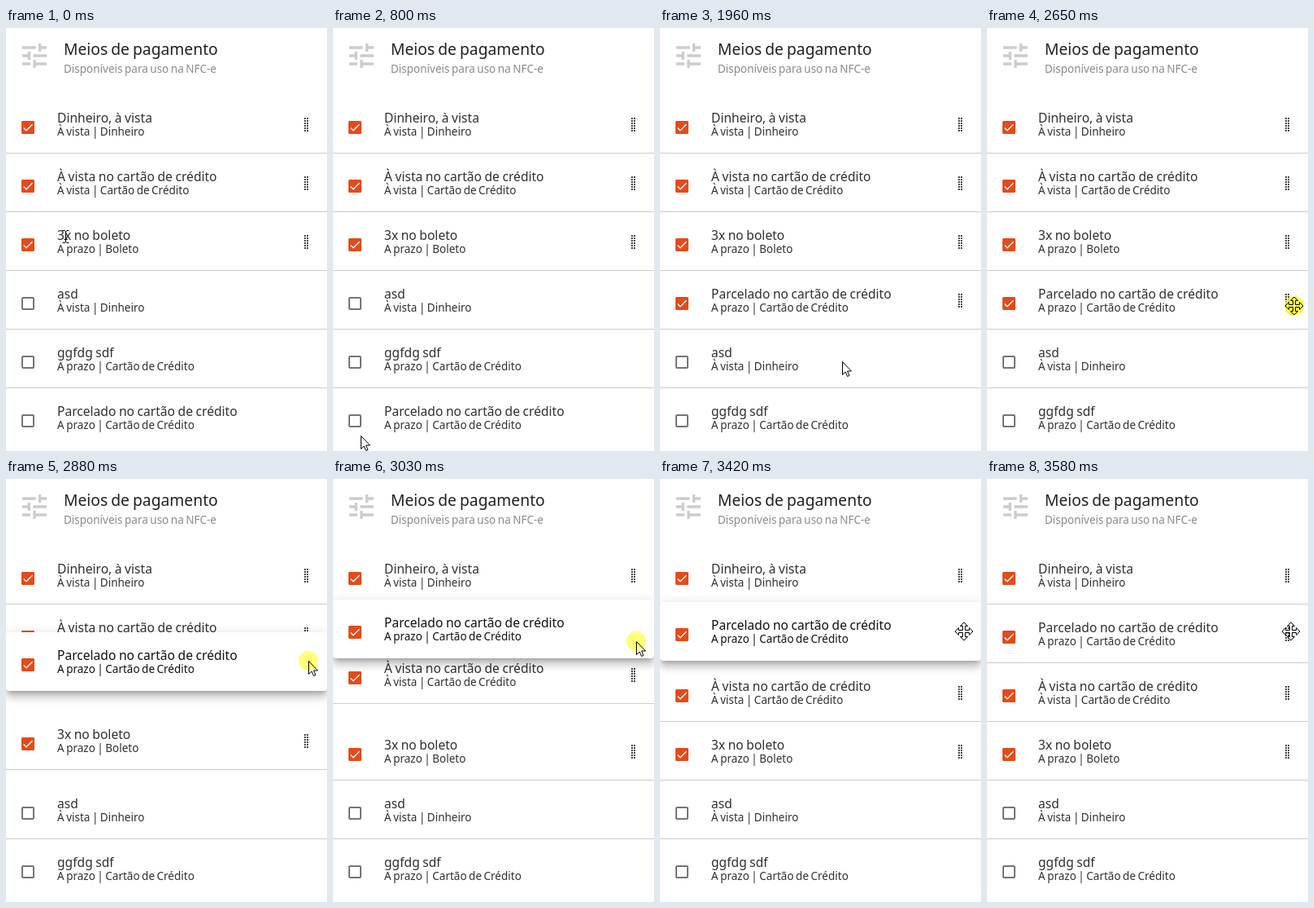
Animation of 395x519 px, one loop 4190 ms. Source, as an HTML page:

```html
<!DOCTYPE html>
<html lang="pt">
<head>
<meta charset="utf-8">
<title>Meios de pagamento</title>
<style>
html, body { margin: 0; width: 100%; height: 100%; overflow: hidden; background: #fff; }
body { position: relative; font-family: "Noto Sans", "Open Sans", sans-serif; }
svg { position: absolute; left: 0; top: 0; overflow: visible; }
text { font-size: 13.5px; word-spacing: -1px; fill: #303030; }
.name { font-size: 15.6px; word-spacing: -.5px; }
.row { position: absolute; left: 0; top: 0; width: 395px; height: 72px; }
.drag {
  z-index: 1; background: #fff; border-radius: 4px;
  box-shadow: 0 5px 5px -3px rgba(0,0,0,.2), 0 8px 10px 1px rgba(0,0,0,.14), 0 3px 14px 2px rgba(0,0,0,.12);
}
.drag text { fill: #111; }
.drag .grip, .drag .line { visibility: hidden; }
#pointer { z-index: 2; }
#pointer path { fill: #fff; stroke: #000; stroke-linejoin: round; }
#pointer circle { fill: #ff0; mix-blend-mode: multiply; }
</style>
</head>
<body>
<svg width="395" height="82">
  <path transform="translate(15 14) scale(1.667)" fill="#ccc" d="M3 17v2h6v-2H3zM3 5v2h10V5H3zm10 16v-2h8v-2h-8v-2h-2v6h2zM7 9v2H3v2h4v2h2V9H7zm14 4v-2H11v2h10zm-6-4h2V7h4V5h-4V3h-2v6z"/>
  <text x="71" y="33" style="font-size:19.3px;fill:#212121">Meios de pagamento</text>
  <text x="71" y="55" style="font-size:13.5px;fill:#8a8a8a">Disponíveis para uso na NFC-e</text>
</svg>
<div id="list"></div>
<svg id="pointer" width="1" height="1">
  <path/>
  <circle r="12"/>
</svg>
<script>
const LOOP = 4190, TOP = 82, STEP = 72;
const REORDER = 1320, GRAB = 2725, RELEASE = 3190, SETTLED = 3500;
const items = [
  ['Dinheiro, à vista', 'À vista | Dinheiro'],
  ['À vista no cartão de crédito', 'À vista | Cartão de Crédito'],
  ['3x no boleto', 'A prazo | Boleto'],
  ['asd', 'À vista | Dinheiro'],
  ['ggfdg sdf', 'A prazo | Cartão de Crédito'],
  ['Parcelado no cartão de crédito', 'A prazo | Cartão de Crédito']
];
const shapes = {
  arrow: 'M.5 .5V16.5L4.2 13 6.6 18.5 9 17.5 6.6 12H11.5Z',
  beam: 'M-3.5-7.5H-1L.5-6.5 2-7.5H4.5M.5-6.5V6.5M-3.5 7.5H-1L.5 6.5 2 7.5H4.5M-1.5 3.5H2.5',
  hand: 'M-2 1.5Q0-1 2 1.5V8Q3.5 6.5 5 8.5Q6.5 7.5 7.5 9.5Q9.5 9 10 11V16Q9 19 8 22.5H-1Q-2 19-5.5 14Q-6.5 11-4 11.5L-2 14ZM2 8V12M5 9V12M7.5 10V12',
  move: 'M0-11L4.5-6.5H1.5V-1.5H6.5V-4.5L11 0 6.5 4.5V1.5H1.5V6.5H4.5L0 11-4.5 6.5H-1.5V1.5H-6.5V4.5L-11 0-6.5-4.5V-1.5H-1.5V-6.5H-4.5Z'
};

const list = document.getElementById('list');
list.innerHTML = items.map(([name, kind]) => `<div class="row"><svg width="395" height="72">
  <circle class="ripple" cx="27" cy="40" r="20"/>
  <rect x="20" y="33" width="14" height="14" rx="1" fill="none" stroke="#757575" stroke-width="2"/>
  <g class="check"><rect x="19" y="32" width="16" height="16" rx="2" fill="#e64a19"/>
    <path d="M21.7 40.5L25 43.7 32.5 36.2" fill="none" stroke="#fff" stroke-width="1.4"/></g>
  <text class="name" x="63" y="34">${name}</text>
  <text x="63" y="50">${kind}</text>
  <path class="grip" d="M368 28V45M371 28V45" stroke="#444" stroke-width="2" stroke-dasharray="2 1"/>
  <rect class="line" y="71" width="395" height="1" fill="#ccc"/>
</svg></div>`).join('');

const rows = [...list.children].map(el => {
  const part = c => el.querySelector('.' + c);
  return { el, ripple: part('ripple'), check: part('check'), grip: part('grip'), line: part('line') };
});
const pointer = document.getElementById('pointer');
const [cursor, halo] = pointer.children;

const span = (t, a, b) => Math.min(1, Math.max(0, (t - a) / (b - a)));
const smooth = x => x * x * (3 - 2 * x);
const out = (x, p) => 1 - (1 - x) ** p;
const mix = (a, b, k) => a + (b - a) * k;

// time, x, y of the pointer's hot spot
const path = [
  [0, 73, 256], [40, 73, 256], [570, 58, 494], [620, 58, 494], [800, 34, 500], [960, 32, 489],
  [1690, 33, 489], [2190, 373, 347], [2350, 378, 341], [2700, 378, 341], [2880, 372, 223],
  [3110, 374, 187], [LOOP, 374, 187]
];

function pointerAt(t) {
  const i = path.findIndex(p => p[0] > t);
  const [t0, x0, y0] = path[i - 1], [t1, x1, y1] = path[i];
  const x = span(t, t0, t1), k = t0 < 2700 ? smooth(x) : x;
  return [Math.round(mix(x0, x1, k)), Math.round(mix(y0, y1, k))];
}

function pointerShape(t, x, y) {
  if (t < 570) {
    const inRow = (y - TOP) % STEP;
    return x > 62 && inRow > 18 && inRow < 55 ? 'beam' : 'arrow';
  }
  if (t >= 1110 && t < 1760) return 'hand';
  if (t >= 2340 && t < GRAB || t >= RELEASE) return 'move';
  return 'arrow';
}

function tops(t) {
  const slots = t < REORDER ? [0, 1, 2, 3, 4, 5] : [0, 1, 2, 4, 5, 3];
  const y = slots.map(s => TOP + s * STEP);
  y[2] += STEP * out(span(t, 2771, 3021), 3);
  y[1] += STEP * out(span(t, 2950, 3200), 3);
  if (t >= GRAB) y[5] = mix(298, 142, out(span(t, 2690, 3110), 2)) + 12 * smooth(span(t, 3270, SETTLED));
  return y;
}

function draw(t) {
  const y = tops(t), last = t < REORDER ? 5 : 4;
  rows.forEach((r, i) => {
    const checked = i < 3 ? 1 : i === 5 ? span(t, 1400, 1570) : 0;
    r.el.style.transform = `translateY(${Math.round(y[i])}px)`;
    r.el.classList.toggle('drag', i === 5 && t >= GRAB && t < SETTLED);
    r.check.style.opacity = checked;
    r.grip.style.display = i < 3 || i === 5 && t >= REORDER ? '' : 'none';
    r.line.style.display = i === last ? 'none' : '';
    r.ripple.style.fill = i === 5 ? '#e64a19' : '#000';
    r.ripple.style.opacity = t < REORDER ? 0
      : i === 5 ? .17 * (1 - span(t, 1360, 1850))
      : i === 4 ? .045 * (1 - span(t, 1730, 1850)) : 0;
  });
  const [px, py] = pointerAt(t), shape = pointerShape(t, px, py);
  pointer.style.transform = `translate(${px}px, ${py}px)`;
  cursor.setAttribute('d', shapes[shape]);
  halo.style.opacity = t < 2500 || t >= RELEASE ? 0 : t < GRAB ? .7 : .52;
}

const start = performance.now();
function tick() {
  draw((performance.now() - start) % LOOP);
  requestAnimationFrame(tick);
}
tick();
</script>
</body>
</html>
```
